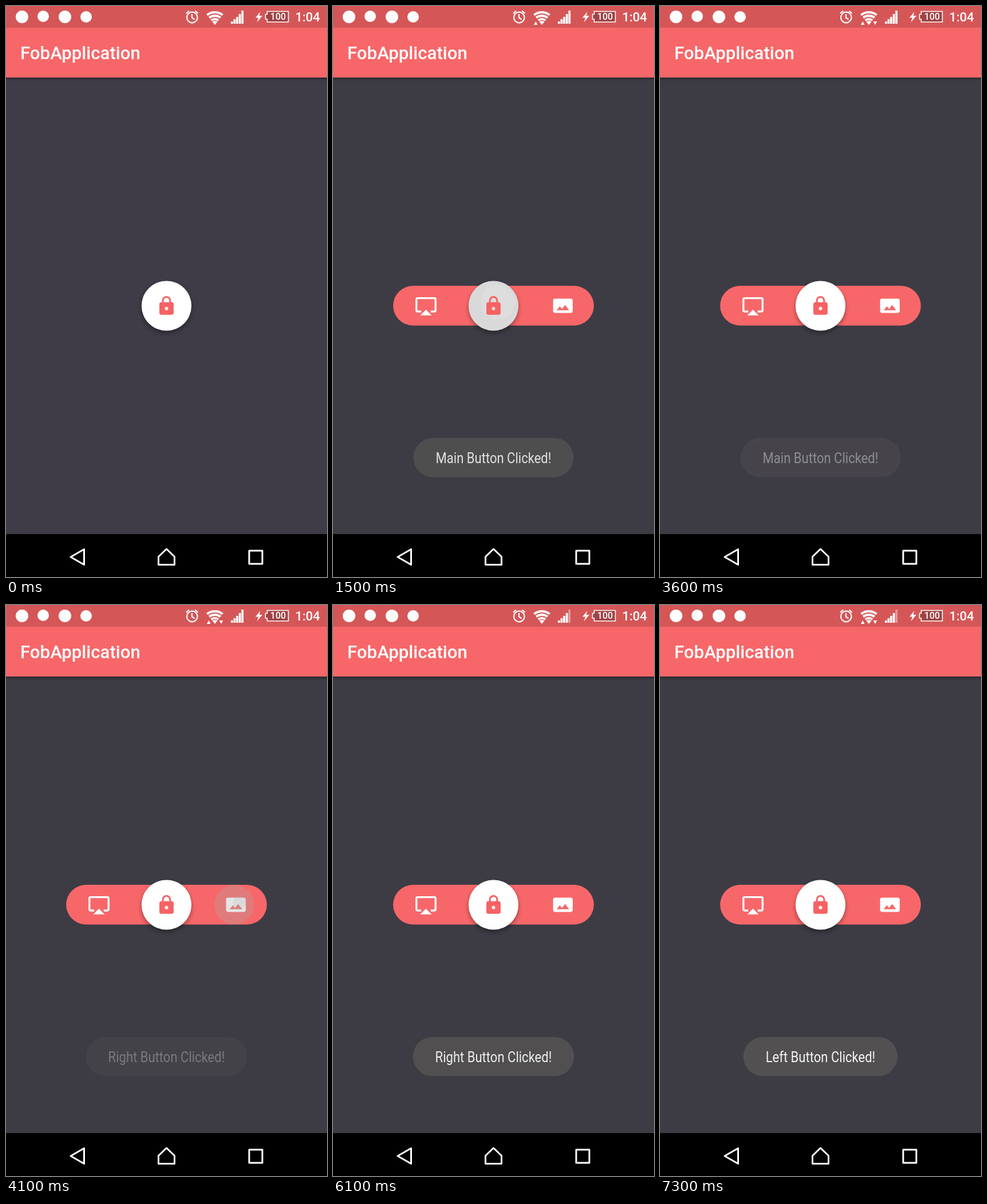
Write an HTML page that moves like this. It is 561x998 px and loops after 8 s.

```html
<!DOCTYPE html>
<html lang="en">
<head>
<meta charset="utf-8">
<title>FobApplication</title>
<style>
  html, body { margin: 0; width: 100%; height: 100%; overflow: hidden; background: #000; }
  svg { display: block; width: 100%; height: 100%; font-family: Roboto, sans-serif; }
</style>
</head>
<body>
<svg viewBox="0 0 561 998">
  <defs>
    <linearGradient id="edge" x2="0" y2="1">
      <stop stop-color="#000" stop-opacity=".38"/>
      <stop offset="1" stop-color="#000" stop-opacity="0"/>
    </linearGradient>
    <filter id="blur" x="-30%" y="-30%" width="160%" height="160%"><feGaussianBlur stdDeviation="4"/></filter>
  </defs>

  <rect id="bg" width="561" height="924"/>
  <rect y="124" width="561" height="7" fill="url(#edge)"/>
  <rect y="37" width="561" height="88" fill="#f76769"/>
  <rect width="561" height="38" fill="#d55657"/>
  <text x="25" y="93" font-size="31.2" font-weight="500" fill="#fff">FobApplication</text>

  <!-- status bar -->
  <g fill="#fff">
    <circle cx="28" cy="19" r="11"/>
    <circle cx="65" cy="18" r="10"/>
    <circle cx="103" cy="19" r="11"/>
    <circle cx="140" cy="19" r="10"/>
    <g fill="none" stroke="#fff" stroke-width="2.2">
      <circle cx="325.300" cy="20" r="9.300"/>
      <path d="M325 14v6.500l4.500 3M315 13l5-4.500M335.500 13l-5-4.500"/>
    </g>
    <g id="wifi" fill="none" stroke="#fff" stroke-width="4"></g>
    <path d="M365 33l-4.500-5.500q4.500-3 9 0z"/>
    <path id="up" d="M351 33l3.300-6 3.300 6z"/>
    <path id="down" d="M372.700 27h6.600l-3.300 6z"/>
    <g id="bars"></g>
    <path d="M444.500 10l-8.500 10.500h5l-2.500 8 9.500-11.500h-5.500z"/>
    <path d="M456.500 9.500h37v18.500h-37v-5h-3v-8.500h3z" fill="#9f4446" stroke="#fff" stroke-width="1.600"/>
    <text x="475.500" y="24.300" font-size="16" font-weight="500" text-anchor="middle">100</text>
    <text x="505.500" y="27" font-size="22" font-weight="500">1:04</text>
  </g>

  <!-- expanding button -->
  <rect id="pill" y="489" height="69.500" rx="34.750" fill="#f76769"/>
  <g id="left" fill="#fff">
    <path transform="scale(1.67) translate(-12 -12)" d="M6 22h12l-6-6zM21 3H3c-1.100 0-2 .9-2 2v12c0 1.100.9 2 2 2h4v-2H3V5h18v12h-4v2h4c1.100 0 2-.9 2-2V5c0-1.100-.9-2-2-2z"/>
  </g>
  <g id="right" fill="#fff">
    <path transform="scale(1.558) translate(-12 -12)" d="M23 18V6c0-1.100-.9-2-2-2H3c-1.100 0-2 .9-2 2v12c0 1.100.9 2 2 2h18c1.100 0 2-.9 2-2zM8.500 12.500l2.500 3.010L14.500 11l4.500 6H5l3.500-4.500z"/>
  </g>
  <g id="rippleLeft" fill="#aaa"><circle cx="162.500" cy="524" r="34.600" opacity=".3"/><circle cx="162.500" cy="524" opacity=".18"/></g>
  <g id="rippleRight" fill="#aaa"><circle cx="399" cy="524" r="34.600" opacity=".3"/><circle cx="408" cy="520" opacity=".18"/></g>
  <circle cx="280.500" cy="528" r="43" opacity=".42" filter="url(#blur)"/>
  <circle cx="280.500" cy="524" r="43.600" fill="#fff"/>
  <g id="rippleMain"><circle cx="280.500" cy="524" r="43.600" fill="#000" opacity=".33"/><circle cx="288" cy="518" fill="#fff" opacity=".1"/></g>
  <path fill="#f76264" transform="translate(280.500 524.100) scale(1.558) translate(-12 -12)" d="M18 8h-1V6c0-2.760-2.240-5-5-5S7 3.240 7 6v2H6c-1.100 0-2 .9-2 2v10c0 1.100.9 2 2 2h12c1.100 0 2-.9 2-2V10c0-1.100-.9-2-2-2zm-6 9c-1.100 0-2-.9-2-2s.9-2 2-2 2 .9 2 2-.9 2-2 2zm3.100-9H8.900V6c0-1.710 1.390-3.100 3.100-3.100 1.710 0 3.100 1.390 3.100 3.100v2z"/>

  <g id="toast">
    <rect id="toastBox" y="755" height="68.500" rx="34.250" fill="#525051"/>
    <text id="toastText" transform="translate(280.500 798.500) scale(.882 1)" font-size="25" text-anchor="middle" fill="#f4f4f4"></text>
  </g>

  <!-- navigation bar -->
  <rect y="923" width="561" height="75"/>
  <g fill="none" stroke="#fff" stroke-width="3" stroke-linejoin="round">
    <path d="M113 963l23.500-13.500v27z"/>
    <path d="M266.500 962.500l14-13.500 14 13.500v14h-28z"/>
    <path d="M425 952h23v23h-23z"/>
  </g>
</svg>
<script>
const LOOP = 8000, STEP = 100, MID = 280.5;
const $ = id => document.getElementById(id);
const set = (el, attrs) => { for (const k in attrs) el.setAttribute(k, attrs[k]); };
const clamp = x => Math.max(0, Math.min(1, x));
const ramp = (t, start, length) => clamp((t - start) / length);

const toasts = [
  { label: 'Main', start: 1240, end: 3240 },
  { label: 'Right', start: 4040, end: 6020 },
  { label: 'Left', start: 6790, end: Infinity }
];

$('wifi').innerHTML = [22, 16, 10].map(r => {
  const dx = r * .62, y = 33 - r * .785;
  return `<path d="M${365 - dx} ${y}A${r} ${r} 0 0 1 ${365 + dx} ${y}"/>`;
}).join('');
$('bars').innerHTML = [4, 8, 12, 17, 23].map((h, i) =>
  `<rect x="${393 + i * 4.6}" y="${31 - h}" width="3.7" height="${h}"/>`).join('');

function ripple(id, t, start, size) {
  const el = $(id), age = t - start;
  set(el, { opacity: ramp(age, 0, 150) * (1 - ramp(age, 270, 330)) });
  set(el.lastChild, { r: 4 + (size - 4) * ramp(age, 50, 400) });
}

function showToast(t) {
  const now = toasts.findLast(x => t >= x.start);
  if (!now) return set($('toast'), { opacity: 0 });
  const text = `${now.label} Button Clicked!`, label = $('toastText');
  if (label.textContent !== text) label.textContent = text;
  const width = label.getComputedTextLength() * .882 + 78;
  set($('toastBox'), { x: MID - width / 2, width });
  const fadeIn = 1 - (1 - ramp(t, now.start, 480)) ** 3;
  set($('toast'), { opacity: fadeIn * (1 - ramp(t, now.end, 480) ** 2) });
}

function draw(t) {
  set($('bg'), { fill: t < 1100 ? '#3f3b47' : '#3d3c45' });

  const open = (1 - Math.cos(Math.PI * ramp(t, 1173, 300))) / 2;
  const half = 27 + 148.4 * open;
  set($('pill'), { x: MID - half, width: half * 2, opacity: +(open > 0) });
  set($('left'), { transform: `translate(${MID - 118 * open} 524)`, opacity: +(open > 0) });
  set($('right'), { transform: `translate(${MID + 121.3 * open} 524)`, opacity: +(open > 0) });

  ripple('rippleMain', t, 1050, 30);
  ripple('rippleRight', t, 3900, 25);
  ripple('rippleLeft', t, 6640, 34);
  showToast(t);

  const busy = t < 4200 || t >= 6800;
  set($('up'), { opacity: +(busy && t >= 1100) });
  set($('down'), { opacity: +(busy && t >= 3200) });
  set($('bars').lastChild, { opacity: t < 4200 ? 1 : .4 });
}

const begin = performance.now();
function tick() {
  const t = (performance.now() - begin) % LOOP;
  draw(Math.floor(t / STEP) * STEP);
  requestAnimationFrame(tick);
}
tick();
</script>
</body>
</html>
```
